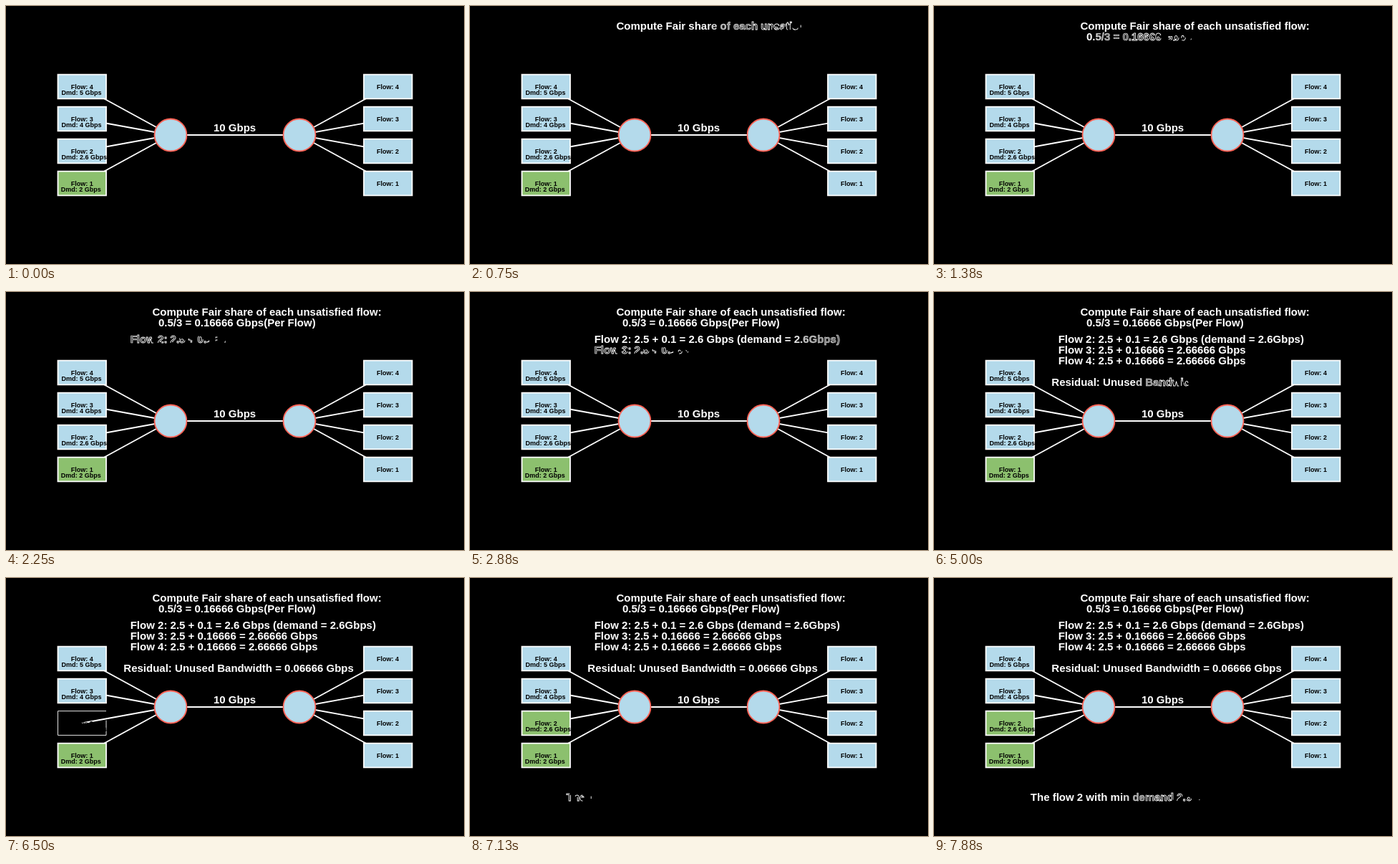
Recreate the animation shown at these times as an HTML page. Size 640 px wide and 360 px high, loop 8 s.

```html
<!DOCTYPE html>
<html lang="en">
<head>
<meta charset="utf-8">
<title>Fair share of a link</title>
<style>
  html, body { margin: 0; width: 100%; height: 100%; overflow: hidden; background: #000; }
  svg { display: block; width: 100vw; height: 100vh; }
  text {
    font: bold 15px "Liberation Sans", Arial, sans-serif;
    font-kerning: none; white-space: pre; fill: #fff;
  }
  text.label { font-size: 9px; fill: #000; }
</style>
</head>
<body>
<svg id="stage" viewBox="0 0 640 360"></svg>
<script>
const LOOP = 8000, STEP = 125;
const BLUE = '#b4daeb', GREEN = '#8cc06e', RED = '#fc6255';
const THICK = 1.8, THIN = 0.9;
const BOX = { w: 67.5, h: 33.75 };
const LEFT = 106.25, RIGHT = 533.75, HUB_IN = 230, HUB_OUT = 410, MID = 180;
const stage = document.getElementById('stage');
const clamp = v => Math.min(1, Math.max(0, v));

function add(tag, attrs, text, parent = stage) {
  const el = document.createElementNS('http://www.w3.org/2000/svg', tag);
  set(el, attrs);
  if (text) el.textContent = text;
  parent.appendChild(el);
  return el;
}

function set(el, attrs) {
  for (const name in attrs) el.setAttribute(name, attrs[name]);
}

function line(x1, y1, x2, y2) {
  add('line', { x1, y1, x2, y2, stroke: '#fff', 'stroke-width': THICK });
}

// The outline runs from the top right corner counterclockwise.
function box(cx, cy, fill) {
  const x = cx + BOX.w / 2, y = cy - BOX.h / 2;
  return add('path', {
    d: `M${x} ${y}h${-BOX.w}v${BOX.h}h${BOX.w}z`,
    pathLength: 1, fill, stroke: '#fff', 'stroke-width': THICK
  });
}

function label(x, y, text) {
  add('text', { x, y, class: 'label' }, text);
}

const flows = [
  { id: 4, demand: '5', x: 77.6 },
  { id: 3, demand: '4', x: 77.6 },
  { id: 2, demand: '2.6', x: 77.6 },
  { id: 1, demand: '2', x: 76.8 }
];
flows.forEach((flow, i) => {
  flow.y = 112.5 + 45 * i;
  line(LEFT, flow.y, HUB_IN, MID);
  line(HUB_OUT, MID, RIGHT, flow.y);
});
line(HUB_IN, MID, HUB_OUT, MID);

for (const flow of flows) {
  flow.box = box(LEFT, flow.y, flow.id === 1 ? GREEN : BLUE);
  box(RIGHT, flow.y, BLUE);
  label(90.7, flow.y + 3.1, `Flow: ${flow.id}`);
  label(flow.x, flow.y + 11.5, `Dmd: ${flow.demand} Gbps`);
  label(518, flow.y + 3.1, `Flow: ${flow.id}`);
}
for (const cx of [HUB_IN, HUB_OUT]) {
  add('circle', { cx, cy: MID, r: 22.5, fill: BLUE, stroke: RED, 'stroke-width': THICK });
}
add('text', { x: 290, y: 175.2 }, '10 Gbps');

// Each note is written letter by letter over two seconds.
const notes = [
  { start: 0, lines: [
    [204.4, 33.4, 'Compute Fair share of each unsatisfied flow:'],
    [212.9, 48.1, '0.5/3 = 0.16666 Gbps(Per Flow)']] },
  { start: 2, lines: [
    [173.7, 71.3, 'Flow 2: 2.5 + 0.1 = 2.6 Gbps (demand = 2.6Gbps)'],
    [173.7, 86, 'Flow 3: 2.5 + 0.16666 = 2.66666 Gbps'],
    [173.7, 100.7, 'Flow 4: 2.5 + 0.16666 = 2.66666 Gbps']] },
  { start: 4, lines: [
    [164.3, 131.1, 'Residual: Unused Bandwidth = 0.06666 Gbps']] },
  { start: 7, lines: [
    [134.8, 311.3, 'The flow 2 with min demand 2.6 Gbps has been satisfied.']] }
];
for (const note of notes) {
  note.letters = [];
  for (const [x, y, text] of note.lines) {
    const row = add('text', { x, y });
    for (const char of text) {
      const el = add('tspan', {}, char, row);
      const outline = /[.:il1()\/=+]/.test(char) ? 28 : 46;
      if (char !== ' ') note.letters.push({ el, outline });
    }
  }
}

// First half of p draws the outline, second half fades the fill in.
function writeShape(el, p, outline, endWidth) {
  const drawn = clamp(2 * p), filled = clamp(2 * p - 1);
  const width = THIN + (endWidth - THIN) * filled;
  set(el, {
    'fill-opacity': filled,
    stroke: drawn > 0 && width > 0 ? '#fff' : 'none',
    'stroke-width': width,
    'stroke-dasharray': drawn < 1 ? `${drawn * outline} ${outline * 9}` : 'none'
  });
}

function draw(sec) {
  for (const { start, letters } of notes) {
    const lag = 4 / letters.length;
    const span = 1 + (letters.length - 1) * lag;
    const pen = clamp((sec - start) / 2) * span;
    letters.forEach(({ el, outline }, i) => writeShape(el, clamp(pen - i * lag), outline, 0));
  }
  const second = flows[2].box, rewriting = sec >= 6;
  second.setAttribute('fill', rewriting ? GREEN : BLUE);
  writeShape(second, rewriting ? clamp((sec - 6.06) / 0.94) : 1, 1, THICK);
}

function tick() {
  const ms = performance.now() % LOOP;
  draw(Math.floor(ms / STEP) * STEP / 1000);
  requestAnimationFrame(tick);
}
tick();
</script>
</body>
</html>
```
